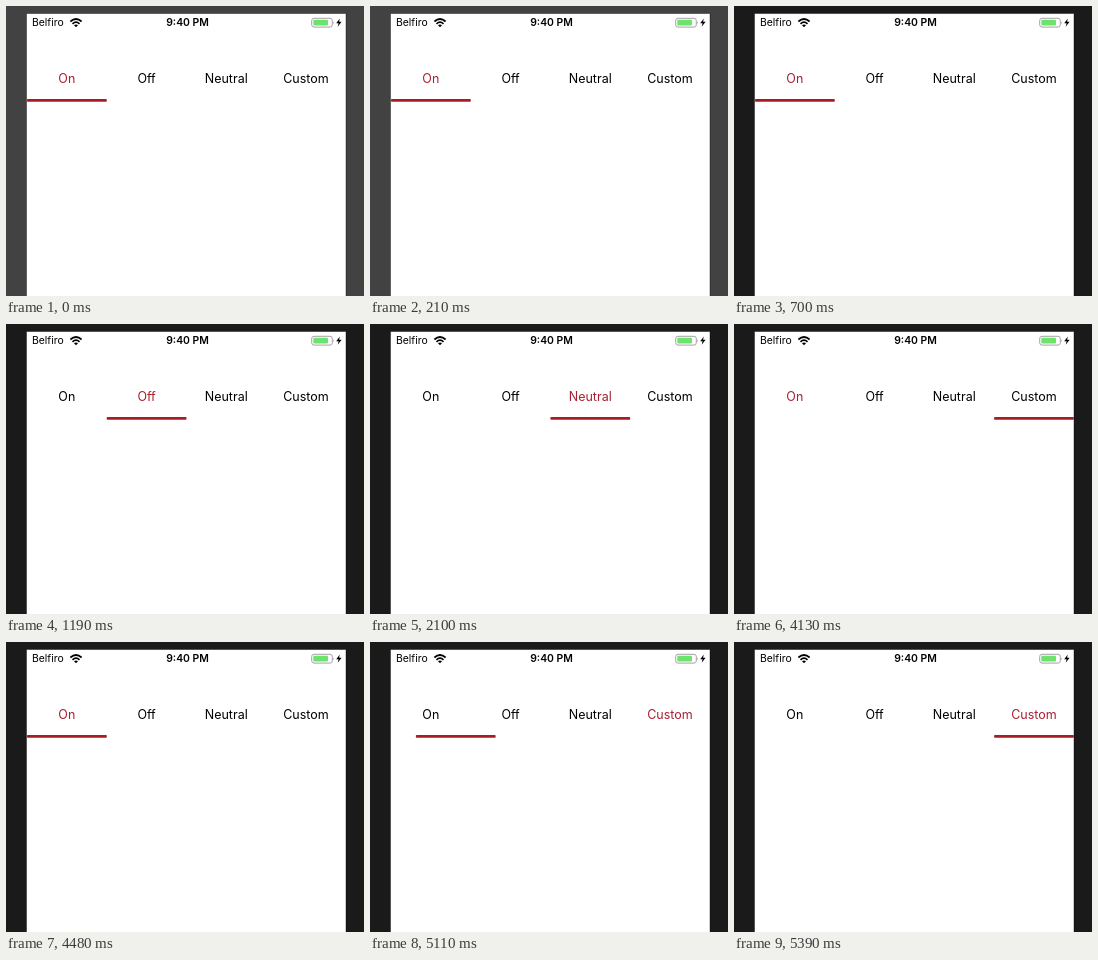
These frames come from a looping animation (358 px wide and 290 px high, 5.74 s). An HTML page:

```html
<!DOCTYPE html>
<html lang="en">
<head>
<meta charset="utf-8">
<title>Sliding tabs</title>
<style>
  html, body { margin: 0; width: 100%; height: 100%; overflow: hidden; }
  svg { display: block; width: 100vw; height: 100vh; }
  text { font-family: Inter, Roboto, sans-serif; }
  .status { font-size: 10.4px; }
  .tab { font-size: 12.5px; text-anchor: middle; }
</style>
</head>
<body>
<svg viewBox="0 0 358 290">
  <rect id="back" width="358" height="290"/>
  <rect x="20.5" y="7.5" width="319.5" height="290" fill="#fff" stroke="#000" stroke-opacity=".4"/>
  <text class="status" x="26" y="20.3">Belfiro</text>
  <g fill="none" stroke="#000" stroke-width="1.7">
    <path d="M64.4 15.5Q70 10.5 75.6 15.5"/>
    <path d="M66.5 17.8Q70 14.6 73.5 17.8"/>
  </g>
  <path d="M68 19.2Q70 17.6 72 19.2L70 21.2Z"/>
  <text class="status" x="181.5" y="20.3" font-weight="600" text-anchor="middle">9:40 PM</text>
  <rect x="305.7" y="12.3" width="20.6" height="8.8" rx="2.3" fill="#fff" stroke="#999" stroke-width=".9"/>
  <rect x="307.3" y="13.8" width="14.7" height="5.8" rx="1" fill="#6be36c"/>
  <path d="M327.2 15.2q1.5 1.5 0 3z" fill="#999"/>
  <path d="M333.8 12.4L330.2 17.2H332.6L331.7 20.8L335.6 15.7H333.1Z"/>
  <g id="tabs"></g>
  <rect id="bar" y="92.9" width="79.8" height="2.9" rx=".8" fill="#a91c22"/>
</svg>
<script>
const LOOP = 5740, STEP = 70;
const LEFT = 21, TAB = 79.7;
const RED = '#a9202f', BLACK = '#000', PRESSED = '#c4c4c4';

// press: label dims, pick: label turns red, slide: bar starts moving
const moves = [
  { from: 0, to: 1, press: 910, pick: 910, slide: 910 },
  { from: 1, to: 2, press: 1820, pick: 1820, slide: 1820 },
  { from: 2, to: 3, press: 2730, pick: 2730, slide: 2730 },
  { from: 3, to: 0, press: 3990, pick: 4130, slide: 4200 },
  { from: 0, to: 3, press: 4970, pick: 5040, slide: 5110 }
];

const back = document.getElementById('back');
const bar = document.getElementById('bar');
const tabs = document.getElementById('tabs');
const labels = ['On', 'Off', 'Neutral', 'Custom'].map((name, i) => {
  const label = document.createElementNS('http://www.w3.org/2000/svg', 'text');
  label.setAttribute('class', 'tab');
  label.setAttribute('x', LEFT + TAB * (i + 0.5));
  label.setAttribute('y', 76.5);
  label.textContent = name;
  tabs.append(label);
  return label;
});

const ease = p => p * p * (3 - 2 * p);
const clamp = p => Math.max(0, Math.min(1, p));

function draw(time) {
  const t = Math.floor((time % LOOP) / STEP) * STEP;
  let active = 0, pressed = -1, place = 0;
  for (const m of moves) {
    if (t < m.press) break;
    pressed = t < m.pick ? m.to : -1;
    if (t >= m.pick) active = m.to;
    const p = clamp((t - m.slide + STEP) / (5 * STEP));
    place = m.from + (m.to - m.from) * ease(p);
  }
  back.setAttribute('fill', t < 700 ? '#424242' : '#1a1a1a');
  bar.setAttribute('x', LEFT + TAB * place);
  labels.forEach((label, i) => {
    label.setAttribute('fill', i === pressed ? PRESSED : i === active ? RED : BLACK);
  });
}

const start = performance.now();
function tick() {
  draw(performance.now() - start);
  requestAnimationFrame(tick);
}
tick();
</script>
</body>
</html>
```
